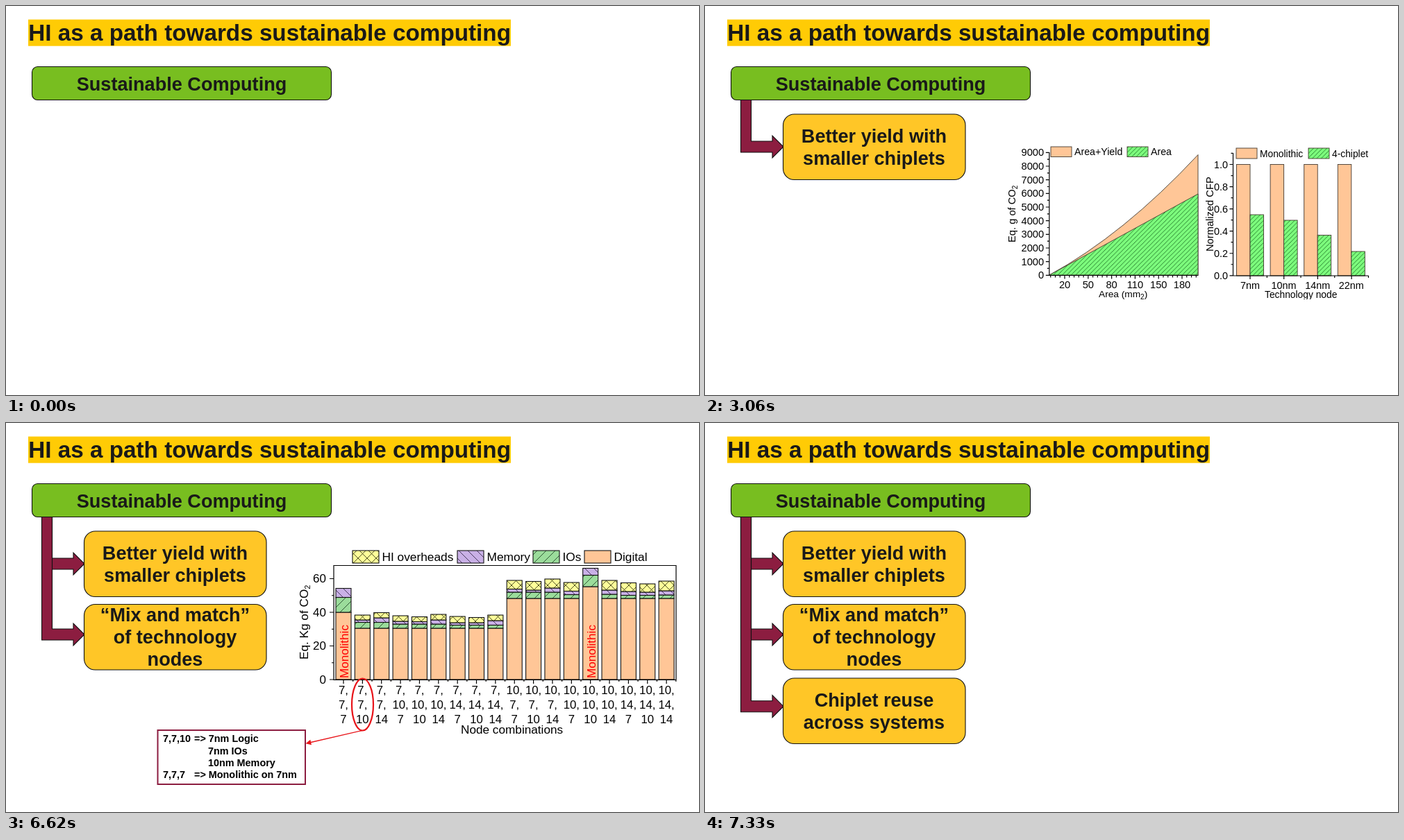
An HTML page that plays this animation: 998x561 px, repeating every 8000 ms.

```html
<!DOCTYPE html>
<html lang="en">
<head>
<meta charset="utf-8">
<title>Sustainable computing</title>
<style>
html, body { margin: 0; width: 100%; height: 100%; overflow: hidden; background: #fff; }
svg { display: block; width: 100%; height: 100%; font-family: "Liberation Sans", Arial, sans-serif; }
.bold { font-weight: 700; fill: #191919; }
.mid { text-anchor: middle; }
.end { text-anchor: end; }
.edge { stroke: #111; stroke-width: 1.1; }
.bar { stroke: #443a30; stroke-width: .9; }
.axis { stroke: #000; stroke-width: 1.2; fill: none; }
.cue { visibility: hidden; animation: 8s step-end infinite; }
#item1 { animation-name: item1; }
#item2 { animation-name: item2; }
#item3 { animation-name: item3; }
#yieldCharts { animation-name: yieldCharts; }
#nodeChart { animation-name: nodeChart; }
@keyframes item1 { 0% { visibility: hidden } 6.25%, 100% { visibility: visible } }
@keyframes item2 { 0% { visibility: hidden } 46%, 100% { visibility: visible } }
@keyframes item3 { 0% { visibility: hidden } 91.625%, 100% { visibility: visible } }
@keyframes yieldCharts { 0% { visibility: hidden } 38.25% { visibility: visible } 46%, 100% { visibility: hidden } }
@keyframes nodeChart { 0% { visibility: hidden } 82.75% { visibility: visible } 91.625%, 100% { visibility: hidden } }
</style>
</head>
<body>
<svg id="stage" viewBox="0 0 998 561" xml:space="preserve"></svg>
<script>
const PEACH = '#ffc697', MAROON = '#8c1d40', RED = '#e8141a';

const text = (x, y, size, str, attrs = '') => `<text x="${x}" y="${y}" font-size="${size}" ${attrs}>${str}</text>`;
const upright = (x, y, size, str, attrs = '') =>
  `<text transform="translate(${x} ${y}) rotate(-90)" font-size="${size}" ${attrs}>${str}</text>`;
const box = (x1, y1, x2, y2, fill, attrs = 'class="bar"') =>
  `<rect x="${x1}" y="${y1}" width="${x2 - x1}" height="${y2 - y1}" fill="${fill}" ${attrs}/>`;
const path = (d, attrs = 'class="axis"') => `<path d="${d}" ${attrs}/>`;
const times = (n, fn) => Array.from({ length: n }, (_, i) => fn(i)).join('');
const sub = size => `<tspan font-size="${size}" dy="3">2</tspan>`;

const slash = s => `M-1 1l2-2M0 ${s}L${s} 0M${s - 1} ${s + 1}l2-2`;
const backslash = s => `M-1 ${s - 1}l2 2M0 0L${s} ${s}M${s - 1}-1l2 2`;
const hatch = (id, s, fill, ink, d) =>
  `<pattern id="${id}" width="${s}" height="${s}" patternUnits="userSpaceOnUse">
    <path d="M0 0h${s}v${s}H0z" fill="${fill}"/><path d="${d}" fill="none" stroke="${ink}" stroke-width=".9"/></pattern>`;

const defs = `<defs>
  ${hatch('lime', 6.4, '#7dff7d', '#23722a', slash(6.4))}
  ${hatch('io', 13, '#9bdc9b', '#234a28', slash(13))}
  ${hatch('memory', 13, '#c9b0e6', '#3c2d50', backslash(13))}
  ${hatch('overhead', 13, '#ffff99', '#3c3c14', slash(13) + backslash(13))}
  <clipPath id="crop"><path d="M430 190H960V423H430z"/></clipPath>
</defs>`;

function item(id, boxTop, arrowY, firstLine, lines) {
  const arrow = `M51.5 135.5H66.5V${arrowY - 8}H97V${arrowY - 16}L113 ${arrowY}L97 ${arrowY + 16}V${arrowY + 8}H51.5Z`;
  return `<g id="${id}" class="cue">
    ${path(arrow, `class="edge" fill="${MAROON}"`)}
    ${box(112.5, boxTop, 375, boxTop + 94.5, '#ffc627', 'rx="16" class="edge"')}
    ${lines.map((line, i) => text(243.5, firstLine + i * 32.2, 27.1, line, 'class="bold mid"')).join('')}
  </g>`;
}

function areaChart() {
  const y = k => 388.3 - k * 19.66;
  const tickX = i => 518 + i * 33.8;
  let ticks = 'M495.8 211V388.5H710.5';
  for (let k = 0; k <= 9; k += .5) ticks += `M495.8 ${y(k)}h${k % 1 ? -3 : -5}`;
  for (let i = 0; i < 32; i++) ticks += `M${tickX(-.6 + i * .2)} 388.5v3`;
  for (let i = 0; i < 6; i++) ticks += `M${tickX(i)} 388.5v5`;
  return path('M496 388Q603 329.5 710 214.5V388Z', `class="bar" fill="${PEACH}"`)
    + path('M496 388L710 271V388Z', 'class="bar" fill="url(#lime)"')
    + path(ticks)
    + times(10, k => text(488, y(k) + 5, 14.6, k ? k * 1000 : 0, 'class="end"'))
    + [20, 50, 80, 110, 150, 180].map((v, i) => text(tickX(i), 407, 14.6, v, 'class="mid"')).join('')
    + text(567, 420, 13.7, `Area (mm${sub(10)}<tspan dy="-3">)</tspan>`)
    + upright(447, 341, 14.7, `Eq. g of CO${sub(10)}`)
    + box(498, 203, 528, 217.5, PEACH) + text(532, 215.3, 14.2, 'Area+Yield')
    + box(608, 203, 638, 217.5, 'url(#lime)') + text(642, 215.3, 14.2, 'Area');
}

function techChart() {
  const tops = [301, 309, 330.5, 354];
  const y = v => 388.8 - v * 160.3;
  let ticks = 'M760.5 212V389H955.5';
  for (let i = 0; i <= 11; i++) ticks += `M760.5 ${y(i / 10)}h${i % 2 ? -3 : -5}`;
  for (let i = 0; i < 8; i++) ticks += `M${785 + i * 24.35} 389v${i % 2 ? 3 : 5}`;
  const group = (top, i) => {
    const x = 765.5 + i * 48.6;
    return box(x, y(1), x + 19.5, 389, PEACH) + box(x + 19.5, top, x + 39, 389, 'url(#lime)')
      + text(x + 19.5, 407.5, 14.4, [7, 10, 14, 22][i] + 'nm', 'class="mid"');
  };
  return tops.map(group).join('') + path(ticks)
    + times(6, i => text(753, y(i / 5) + 5, 14.4, (i / 5).toFixed(1), 'class="end"'))
    + text(806, 421, 13.8, 'Technology node')
    + upright(732, 354, 14.7, 'Normalized CFP')
    + box(765, 205, 795, 220, PEACH) + text(799, 217.6, 13.8, 'Monolithic')
    + box(869, 205, 899, 220, 'url(#lime)') + text(903, 217.6, 13.8, '4-chiplet');
}

function nodeChart() {
  const nodes = [7, 10, 14];
  const single = { 0: [273, 251.5, 238.5], 13: [236, 219.5, 209.5] };
  const ioTops = [0, 287.5, 287.5, 290, 290, 290, 291.5, 291.5, 291.5, 244, 244, 244, 247.5, 0, 247, 248.5, 248.5, 248];
  const memoryTops = [0, 284, 281, 286, 286.5, 284, 288, 288, 285, 239.5, 241, 238, 242.5, 0, 241, 243, 244, 242];
  const overheadTops = [0, 277, 273.5, 278, 279.5, 276, 279, 280.5, 277, 227, 228.5, 225, 230, 0, 227, 230.5, 232, 228];
  const fills = [PEACH, 'url(#io)', 'url(#memory)', 'url(#overhead)'];
  const centre = i => 486 + i * 27.36;

  const column = i => {
    const tops = single[i] || [i < 9 ? 296 : 253, ioTops[i], memoryTops[i], overheadTops[i]];
    const x = centre(i);
    const combo = [nodes[Math.floor(i / 9)] + ',', nodes[Math.floor(i / 3) % 3] + ',', nodes[i % 3]];
    return tops.map((top, k) => box(x - 11, top, x + 11, k ? tops[k - 1] : 370, fills[k], 'class="edge"')).join('')
      + combo.map((n, k) => text(x, 391 + k * 21, 16.8, n, 'class="mid"')).join('')
      + (single[i] ? upright(x + 7, 368, 17.1, 'Monolithic', 'fill="#f00"') : '');
  };

  let ticks = 'M472 205.5H965V370.3H472Z';
  for (let k = 0; k < 7; k++) ticks += `M472 ${370 - k * 24.25}h${k % 2 ? -3 : -6}`;
  for (let i = 0; i < 36; i++) ticks += `M${centre(i / 2)} 370v${i % 2 ? 3 : 6}`;

  const legend = [[499, 'HI overheads', 3], [650, 'Memory', 2], [759, 'IOs', 1], [833, 'Digital', 0]]
    .map(([x, label, k]) => box(x, 184, x + 38, 202, fills[k], 'class="edge"') + text(x + 42.5, 199.2, 17.3, label)).join('');
  const note = [[226, 460, '7,7,10'], [271, 460, '=&gt; 7nm Logic'], [291, 477.5, '7nm IOs'], [291, 495, '10nm Memory'],
    [226, 512, '7,7,7'], [271, 512, '=&gt; Monolithic on 7nm']]
    .map(([x, y, str]) => text(x, y, 14.4, str, 'font-weight="700"')).join('');

  return times(18, column) + path(ticks) + legend
    + times(4, k => text(461, 375.5 - k * 48.5, 17, k * 20, 'class="end"'))
    + text(655, 448, 17.2, 'Node combinations')
    + upright(435, 341, 17.2, `Eq. Kg of CO${sub(11)}`)
    + `<ellipse cx="513.5" cy="406" rx="15.5" ry="37.5" fill="none" stroke="${RED}" stroke-width="2.2"/>`
    + path('M513 443.5L437 461', `stroke="${RED}" stroke-width="1.3"`)
    + path('M431.5 462.3L438.3 456.8L440 464.2Z', `fill="${RED}"`)
    + box(218.5, 443, 431, 521, '#fff', `stroke="${MAROON}" stroke-width="2"`) + note;
}

document.getElementById('stage').innerHTML = defs
  + box(32, 19.5, 727, 57.7, '#ffcb05', '')
  + text(32.3, 49.7, 33.26, 'HI as a path towards sustainable computing', 'class="bold"')
  + box(37.5, 87.5, 468.5, 135.5, '#78be20', 'rx="8" class="edge"')
  + text(253, 121.5, 27.1, 'Sustainable Computing', 'class="bold mid"')
  + item('item1', 156, 203, 197, ['Better yield with', 'smaller chiplets'])
  + item('item2', 261.5, 305, 286, ['“Mix and match”', 'of technology', 'nodes'])
  + item('item3', 368, 408.7, 409, ['Chiplet reuse', 'across systems'])
  + `<g id="yieldCharts" class="cue" clip-path="url(#crop)">${areaChart()}${techChart()}</g>`
  + `<g id="nodeChart" class="cue">${nodeChart()}</g>`;
</script>
</body>
</html>
```
